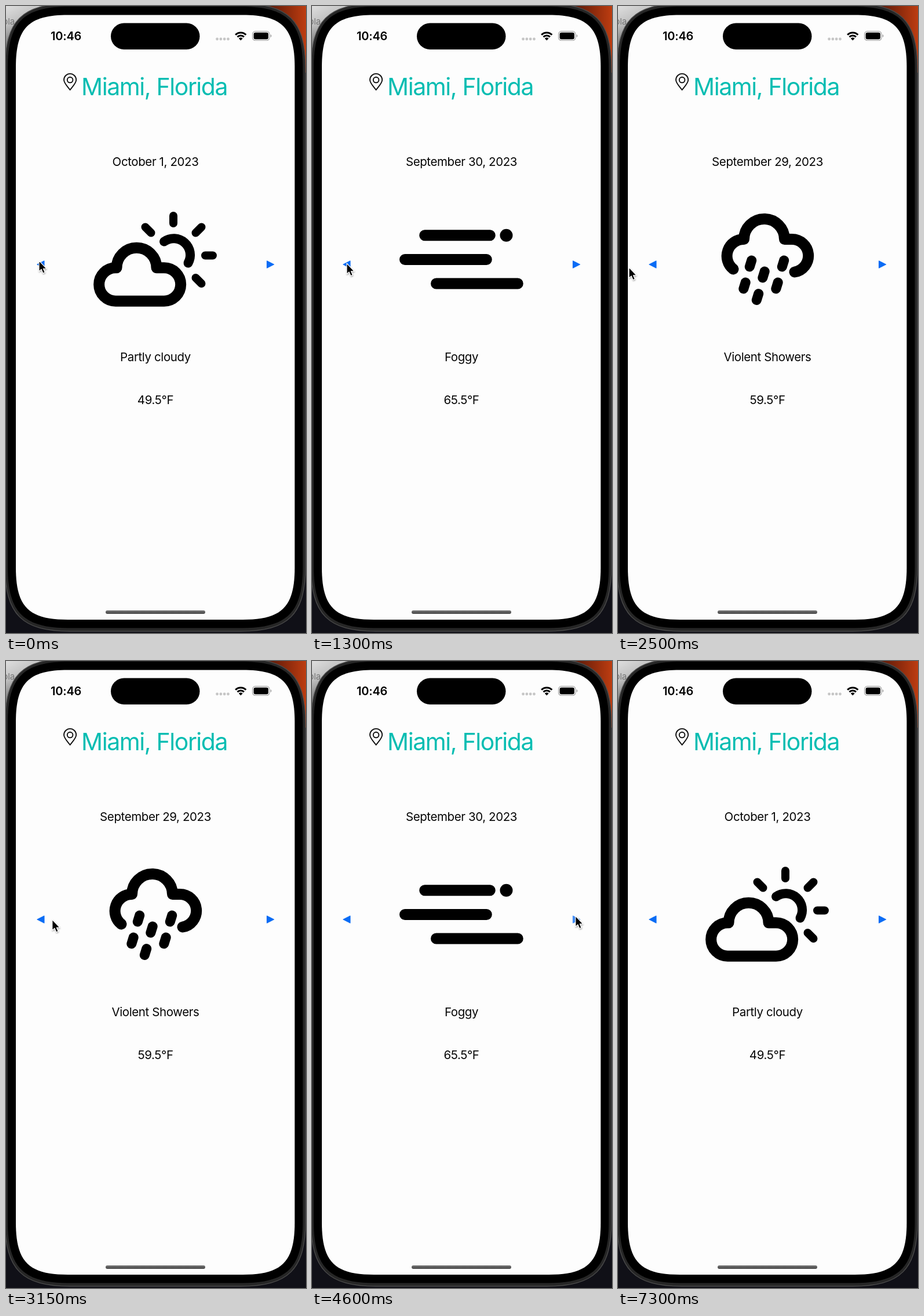
An HTML page for the animation above (7350 ms loop, 518x1082 px).

```html
<!DOCTYPE html>
<html lang="en">
<head>
<meta charset="utf-8">
<title>Weather</title>
<style>
html, body { margin: 0; width: 100%; height: 100%; overflow: hidden; background: #101017; }
svg { display: block; width: 100vw; height: 100vh; }
text { font-family: Inter, "Liberation Sans", sans-serif; font-optical-sizing: none; }
.label { font-size: 20.5px; letter-spacing: -.4px; text-anchor: middle; fill: #050505; }
.icon { fill: none; stroke: #000; stroke-linecap: round; stroke-linejoin: round; }
.arrow { fill: #0a6cf5; stroke: #0a6cf5; stroke-width: 1.4; stroke-linejoin: round; }
</style>
</head>
<body>
<svg viewBox="0 0 518 1082">
  <defs>
    <linearGradient id="paper" gradientUnits="userSpaceOnUse" x1="0" y1="0" x2="26" y2="50">
      <stop offset="0" stop-color="#dedede"/><stop offset=".5" stop-color="#c4c4c4"/><stop offset="1" stop-color="#858585"/>
    </linearGradient>
    <linearGradient id="ember" gradientUnits="userSpaceOnUse" x1="450" y1="0" x2="518" y2="0">
      <stop offset="0" stop-color="#54190a"/><stop offset=".55" stop-color="#8f2b0c"/><stop offset="1" stop-color="#bd3d11"/>
    </linearGradient>
    <linearGradient id="bar" x2="0" y2="1">
      <stop offset="0" stop-color="#777"/><stop offset="1" stop-color="#444"/>
    </linearGradient>
    <filter id="shade" x="-50%" y="-50%" width="200%" height="200%">
      <feDropShadow dx="0.5" dy="1.5" stdDeviation="1.2" flood-opacity=".4"/>
    </filter>
  </defs>

  <rect width="518" height="1082" fill="#101017"/>
  <rect width="90" height="115" fill="url(#paper)"/>
  <rect x="430" width="88" height="115" fill="url(#ember)"/>
  <text x="-6" y="32" font-size="15" fill="#777">pla</text>

  <path id="rim" fill="#262626" stroke="#4c4c4c" stroke-width="1.3"/>
  <path id="bezel"/>
  <path id="screen" fill="#fdfdfd"/>

  <text x="77" y="59" font-size="20" font-weight="600" letter-spacing="-.2">10:46</text>
  <rect x="181" y="29.5" width="153.5" height="45.5" rx="22.75"/>
  <path d="M364.6 57H384" stroke="#c6c6c6" stroke-width="4.8" stroke-linecap="round" stroke-dasharray="0 6.3"/>
  <g fill="none" stroke="#000" stroke-width="3">
    <path d="M396.2 49.8A12.6 12.6 0 0 1 414.4 49.8M399.6 53.4A8 8 0 0 1 411 53.4"/>
    <path d="M405.3 59.5L401.9 56A4.8 4.8 0 0 1 408.7 56Z" fill="#000" stroke="none"/>
  </g>
  <rect x="425.6" y="43.7" width="29.4" height="15.8" rx="5" fill="none" stroke="#a2a2a2" stroke-width="1.2"/>
  <rect x="427.6" y="45.7" width="25.4" height="11.8" rx="3.3"/>
  <path d="M456.7 49v5.2q1.8-.8 1.8-2.6t-1.8-2.6" fill="#a2a2a2"/>

  <g fill="none" stroke="#111" stroke-width="1.9">
    <path d="M110.6 144.7C106 138.8 100 133 100 127.5a10.6 10.6 0 0 1 21.2 0C121.2 133 115.2 138.8 110.6 144.7Z"/>
    <circle cx="110.6" cy="127.6" r="4.8"/>
  </g>
  <text x="130" y="154" font-size="41" letter-spacing="-1.4" fill="#06bdb2">Miami, Florida</text>

  <text id="date" class="label" x="258" y="276"/>
  <text id="sky" class="label" x="258" y="613"/>
  <text id="temp" class="label" x="258" y="687"/>

  <g id="cloudy" class="icon">
    <path stroke-width="19" d="M189.3 509.2H273a28.7 28.7 0 0 0 0-57.4H260a34.5 34.5 0 0 0-69 0H189.3a28.7 28.7 0 0 0 0 57.4Z"/>
    <path stroke-width="16" d="M273 406.5A28.5 28.5 0 0 1 314.5 443.5"/>
    <path stroke-width="14" d="M289 362v13M344 430.5h13M240.5 381.5l10 10M337.5 381.5l-10 10M327.5 469l10 10"/>
  </g>
  <g id="foggy" class="icon">
    <path stroke-width="19" d="M194.7 395.7H307.3M160.5 437.5H301.3M214.5 479H355.3"/>
    <circle cx="335.5" cy="395.7" r="11" fill="#000" stroke="none"/>
  </g>
  <g id="showers" class="icon">
    <path stroke-width="19" d="M199 454A28.9 28.9 0 0 1 217.5 402.5a35 35 0 0 1 70 0H300A28.45 28.45 0 0 1 305 459"/>
    <path id="drops" stroke-width="17"/>
  </g>

  <path id="left" class="arrow" d="M54 446L65.8 440V452Z"/>
  <path id="right" class="arrow" d="M462.5 446L450.7 440V452Z"/>
  <rect x="172" y="1043" width="172" height="6" rx="3" fill="url(#bar)"/>
  <path id="cursor" d="M0 -1V17.4L4 13.8 7 20.6 10.2 19.2 7.4 12.7H12.8Z" stroke="#fff" stroke-width="1.1" stroke-linejoin="round" filter="url(#shade)"/>
</svg>

<script>
const LOOP = 7350;
const $ = id => document.getElementById(id);

// Rounded box whose corners ease into the sides; a larger pull flattens them.
function softBox(x0, y0, x1, y1, reach, pull) {
  const a = reach, c = pull;
  return `M${x0 + a} ${y0}H${x1 - a}C${x1 - c} ${y0} ${x1} ${y0 + c} ${x1} ${y0 + a}` +
    `V${y1 - a}C${x1} ${y1 - c} ${x1 - c} ${y1} ${x1 - a} ${y1}` +
    `H${x0 + a}C${x0 + c} ${y1} ${x0} ${y1 - c} ${x0} ${y1 - a}` +
    `V${y0 + a}C${x0} ${y0 + c} ${x0 + c} ${y0} ${x0 + a} ${y0}Z`;
}
$("rim").setAttribute("d", softBox(-1.5, -4, 517, 1079, 112, 29));
$("bezel").setAttribute("d", softBox(3, 1, 512.5, 1073.5, 106, 27));
$("screen").setAttribute("d", softBox(17, 15.5, 498.5, 1059, 90, 22));

const drops = [[229, 444.5], [285, 444.5], [251.5, 463.5], [218.5, 482.5], [274.5, 482.5], [241, 502]];
$("drops").setAttribute("d", drops.map(([x, y]) => `M${x + 1.7} ${y - 5.5}l-3.4 11`).join(""));

const days = {
  cloudy: ["October 1, 2023", "Partly cloudy", "49.5°F"],
  foggy: ["September 30, 2023", "Foggy", "65.5°F"],
  showers: ["September 29, 2023", "Violent Showers", "59.5°F"]
};
const schedule = [[0, "cloudy"], [800, "foggy"], [1700, "showers"], [4450, "foggy"], [4950, "cloudy"]];

const presses = { left: [700, 1600], right: [4450, 4950] };
const PRESS_TIME = 200;

// time, x, y of the pointer tip
const route = [
  [0, 57, 440.5], [700, 57, 441], [1000, 60, 445], [1900, 60, 445],
  [2450, 19, 452], [2600, 19, 452], [3050, 60, 448], [3750, 412, 435],
  [3850, 413, 435], [4200, 455, 441], [5300, 455, 441], [6000, 250, 400], [6600, 240, -30]
];

function pointerAt(t) {
  const i = route.findIndex(stop => stop[0] > t);
  if (i < 0) return route[route.length - 1].slice(1);
  const [t0, x0, y0] = route[i - 1], [t1, x1, y1] = route[i];
  const k = (t - t0) / (t1 - t0), e = k * k * (3 - 2 * k);
  return [x0 + (x1 - x0) * e, y0 + (y1 - y0) * e];
}

function draw(t) {
  const day = schedule.filter(([start]) => start <= t).pop()[1];
  for (const name in days) $(name).style.display = name === day ? "" : "none";
  ["date", "sky", "temp"].forEach((id, i) => { $(id).textContent = days[day][i]; });
  for (const side in presses) {
    const down = presses[side].some(start => t >= start && t < start + PRESS_TIME);
    $(side).setAttribute("opacity", down ? .75 : 1);
  }
  $("cursor").setAttribute("transform", `translate(${pointerAt(t)})`);
}

const begin = performance.now();
function tick() {
  draw((performance.now() - begin) % LOOP);
  requestAnimationFrame(tick);
}
tick();
</script>
</body>
</html>
```
